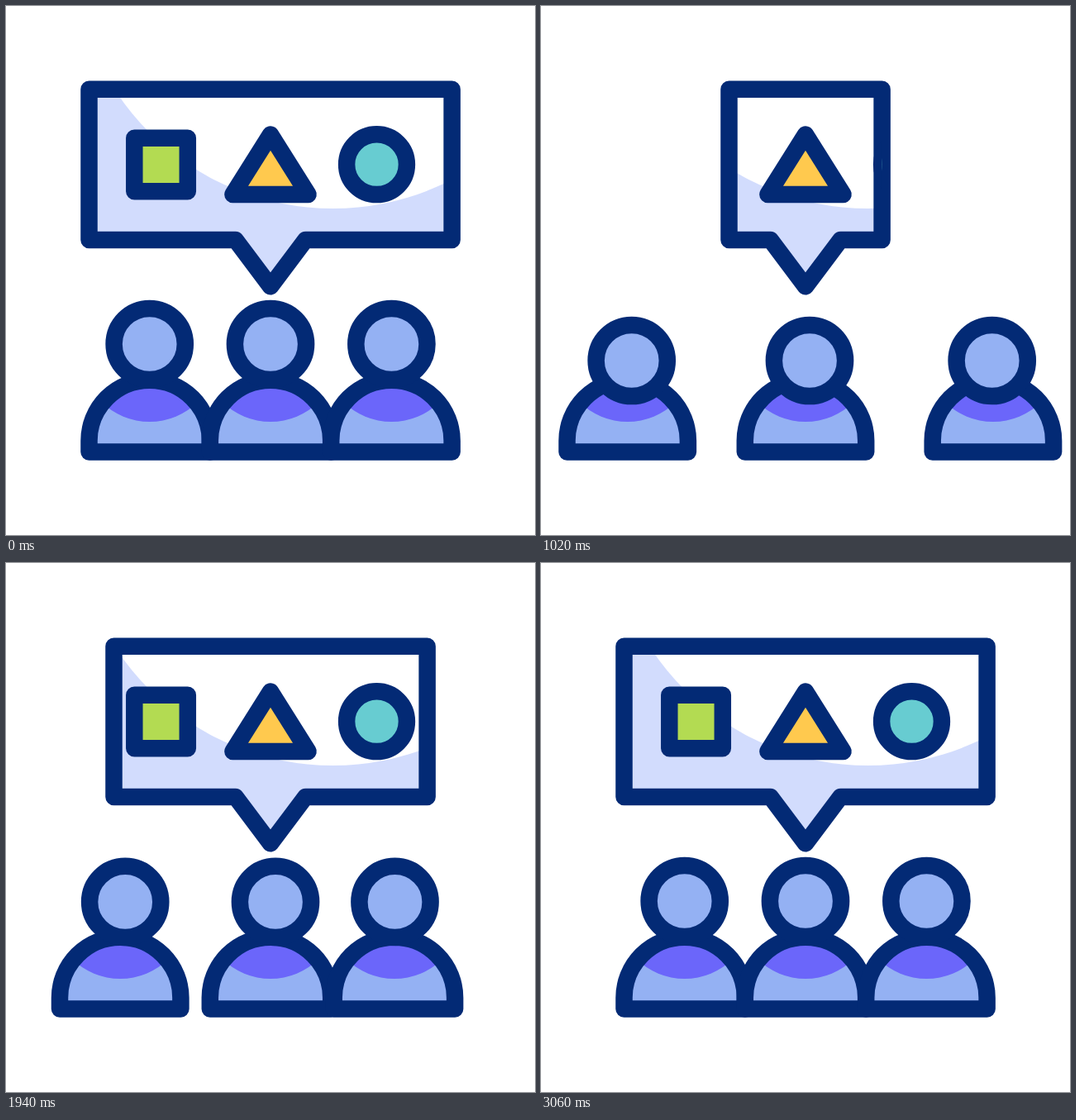
Recreate the animation shown at these times as an HTML page. Size 640 px wide and 640 px high, loop 3600 ms.

```html
<!DOCTYPE html>
<html lang="en">
<head>
<meta charset="utf-8">
<title>Audience and shapes</title>
<style>
  html, body { margin: 0; width: 100%; height: 100%; overflow: hidden; background: #fff; }
  svg { display: block; width: 100%; height: 100%; }
  .line { stroke: #032a75; stroke-width: 20.5; stroke-linejoin: round; }
  .skin { fill: #94b1f3; }
</style>
</head>
<body>
<svg viewBox="0 0 640 640">
  <defs>
    <clipPath id="inside"><path class="bubble"/></clipPath>
    <clipPath id="torso"><path d="M-73.2 539.5V526a73.2 73.2 0 0 1 146.4 0V539.5Z"/></clipPath>
    <g id="body">
      <g clip-path="url(#torso)">
        <rect class="skin" x="-80" y="440" width="160" height="110"/>
        <circle cy="420" r="83" fill="#6b66fa"/>
      </g>
      <path class="line" fill="none" d="M-73.2 539.5V526a73.2 73.2 0 0 1 146.4 0V539.5Z"/>
    </g>
    <circle id="head" class="line skin" cy="409" r="43.1"/>
  </defs>

  <g clip-path="url(#inside)">
    <rect x="90" y="90" width="460" height="260" fill="#d2dcfd"/>
    <circle cx="395.5" cy="-69" r="314" fill="#fff"/>
  </g>
  <path class="bubble line" fill="none"/>
  <g class="line" clip-path="url(#inside)">
    <rect x="155.3" y="159.8" width="64.5" height="64.5" fill="#b3db52"/>
    <path d="M320 155.5L365.6 228H274.4Z" fill="#ffc94e"/>
    <circle cx="448.5" cy="191.7" r="36.4" fill="#67ccd1"/>
  </g>

  <g id="people"></g>
</svg>
<script>
const LOOP = 3600, STEP = 20;

// Smooth curve through [time, value] points, level at every turning point.
function track(points) {
  const rate = i => (points[i + 1][1] - points[i][1]) / (points[i + 1][0] - points[i][0]);
  const slope = points.map((_, i) => {
    if (i === 0 || i === points.length - 1) return 0;
    const a = rate(i - 1), b = rate(i);
    return a * b > 0 ? 2 * a * b / (a + b) : 0;
  });
  return t => {
    const last = points.length - 1;
    if (t >= points[last][0]) return points[last][1];
    const i = points.findIndex(p => p[0] > t) - 1;
    const [t0, v0] = points[i], [t1, v1] = points[i + 1];
    const h = t1 - t0, u = (t - t0) / h, w = 1 - u;
    return v0 * w * w * (1 + 2 * u) + v1 * u * u * (3 - 2 * u)
      + h * u * w * (slope[i] * w - slope[i + 1] * u);
  };
}

// A bounce off zero is a swing through zero with the sign dropped.
const bounce = points => {
  const swing = track(points);
  return t => Math.abs(swing(t));
};

const inset = bounce([[0, 0], [480, 77], [1020, 127], [1120, 127.5], [1440, 122], [1940, 30],
  [2330, -42], [2640, -11], [2880, 5], [3060, 0]]);
const goLeft = bounce([[0, 0], [480, 9], [540, 15.5], [1020, 69], [1080, 73], [1340, 80],
  [1440, 79.5], [1630, 77], [1940, 35.5], [2400, -28], [2640, -15], [2700, -12], [2940, 3], [3060, 0]]);
const goRight = bounce([[0, 0], [480, 47.5], [540, 55.5], [1020, 80.5], [1120, 81.5], [1440, 75.5],
  [1630, 57], [1940, 3.5], [2300, -29], [2640, -11.5], [2700, -5.5], [2900, 4], [3060, 0]]);
const nod = track([[0, 0], [480, 10], [960, 20], [1080, 20], [1440, 13.7], [1940, 0.9], [2040, 0]]);
const sway = track([[0, 0], [480, 15.8], [600, 16.5], [1020, 5], [1440, -17], [1500, -17.5],
  [1940, 6], [2060, 7], [2500, 0]]);
const swayRight = track([[0, 0], [480, -4], [600, -4.2], [1020, -1.2], [1440, 10], [1500, 10.4],
  [1940, 0.6], [2200, 0]]);

const people = [
  { x: 173.7, move: t => -goLeft(t), sway },
  { x: 320, move: () => 0, sway },
  { x: 466.4, move: goRight, sway: swayRight }
];

const crowd = document.getElementById("people");
function use(id) {
  const el = document.createElementNS("http://www.w3.org/2000/svg", "use");
  el.setAttribute("href", "#" + id);
  return crowd.appendChild(el);
}
for (const p of people) {
  p.body = use("body");
  p.head = use("head");
}
const place = (el, x, y) => el.setAttribute("transform", `translate(${x.toFixed(2)} ${y.toFixed(2)})`);
const bubbles = document.querySelectorAll(".bubble");

function draw(t) {
  const d = inset(t), left = 100.5 + d, right = 539.6 - d;
  const shape = `M${left} 100.7H${right}V282.9H362.4L320 339.3L277.6 282.9H${left}Z`;
  bubbles.forEach(b => b.setAttribute("d", shape));
  for (const p of people) {
    const x = p.x + p.move(t);
    place(p.body, x, 0);
    place(p.head, x + p.sway(t), nod(t));
  }
}

const start = performance.now();
function tick() {
  const t = (performance.now() - start) % LOOP;
  draw(Math.floor(t / STEP) * STEP);
  requestAnimationFrame(tick);
}
tick();
</script>
</body>
</html>
```
